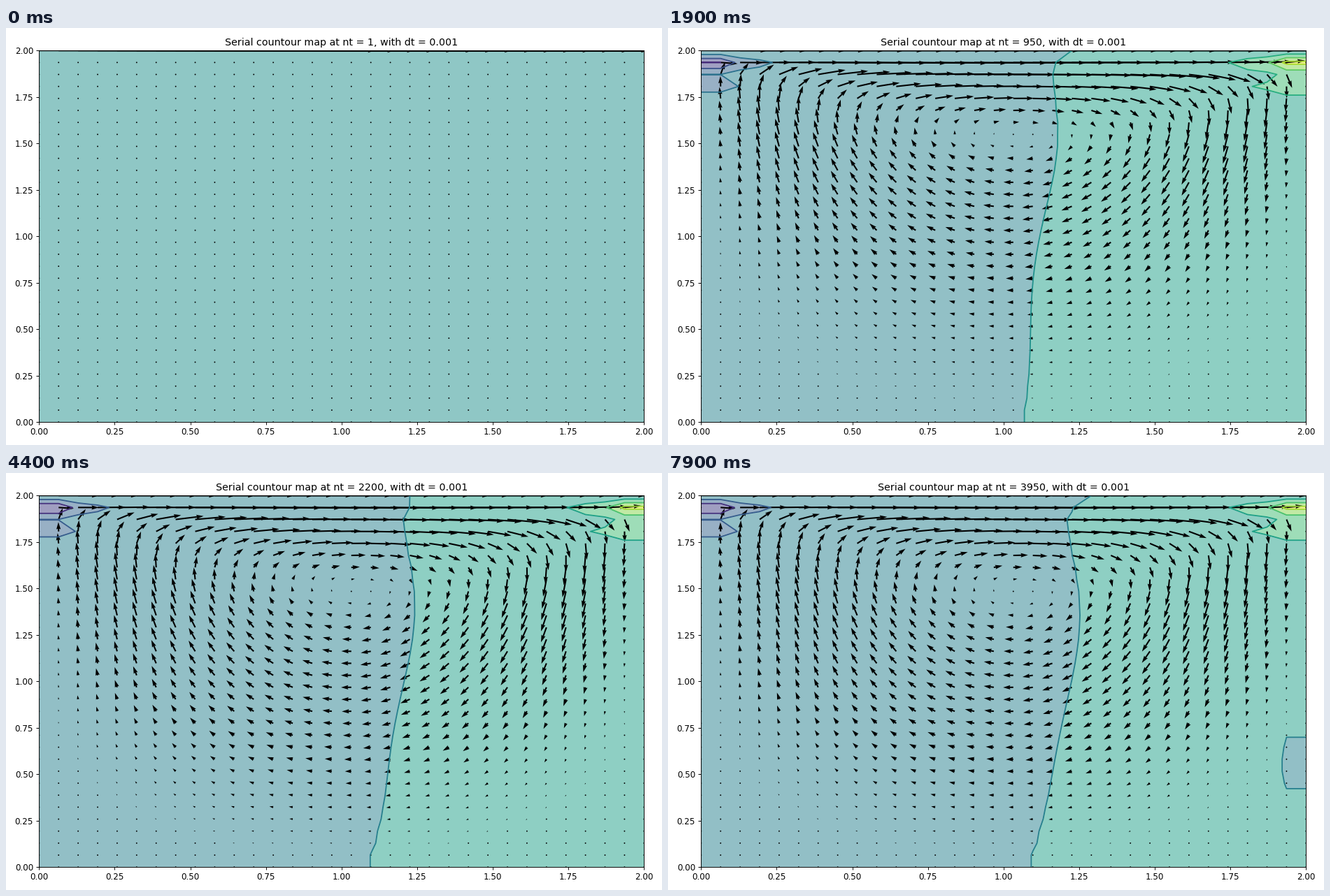
A matplotlib script for the animation above (8000 ms loop, 938 by 597 pixels).

```python
import numpy as np
import matplotlib.pyplot as plt
from matplotlib.animation import FuncAnimation
from matplotlib.colors import CenteredNorm

W, H, DPI = 938, 597, 85.27
LEFT, RIGHT, TOP, BOTTOM = 47.3, 912.3, 32.2, 564.2   # axes box in pixels
N = 32            # grid points per side
DT = 0.001
RHO, NU = 1.0, 0.1
SWEEPS = 50       # Jacobi sweeps per time step
FRAMES, STRIDE = 80, 50

h = 2 / (N - 1)
axis = np.linspace(0, 2, N)
X, Y = np.meshgrid(axis, axis)

# The Jacobi sweep is separable, so all sweeps are applied at once in its
# eigenbasis: zero-gradient walls left, right and below, p = 0 at the lid.
shift = np.eye(N - 2, k=1) + np.eye(N - 2, k=-1)
sx, sy = shift.copy(), shift.copy()
sx[0, 0] = sx[-1, -1] = sy[0, 0] = 1
lx, qx = np.linalg.eigh(sx)
ly, qy = np.linalg.eigh(sy)
mu = (ly[:, None] + lx[None, :]) / 4
decay = mu ** SWEEPS
gain = (1 - decay) / (1 - mu)


def pressure(p, u, v):
    ux = (u[1:-1, 2:] - u[1:-1, :-2]) / (2 * h)
    uy = (u[2:, 1:-1] - u[:-2, 1:-1]) / (2 * h)
    vx = (v[1:-1, 2:] - v[1:-1, :-2]) / (2 * h)
    vy = (v[2:, 1:-1] - v[:-2, 1:-1]) / (2 * h)
    b = RHO * ((ux + vy) / DT - ux**2 - 2 * uy * vx - vy**2)
    modes = decay * (qy.T @ p[1:-1, 1:-1] @ qx)
    modes += gain * (qy.T @ (-h * h / 4 * b) @ qx)
    out = np.zeros_like(p)
    out[1:-1, 1:-1] = qy @ modes @ qx.T
    out[:, -1] = out[:, -2]
    out[0] = out[1]
    out[:, 0] = out[:, 1]
    out[-1] = 0
    return out


def advance(f, u, v, grad):
    c = f[1:-1, 1:-1]
    west, east = f[1:-1, :-2], f[1:-1, 2:]
    south, north = f[:-2, 1:-1], f[2:, 1:-1]
    new = np.zeros_like(f)
    new[1:-1, 1:-1] = (
        c
        - DT / h * (u[1:-1, 1:-1] * (c - west) + v[1:-1, 1:-1] * (c - south))
        - DT / (2 * RHO * h) * grad
        + NU * DT / h**2 * (east + west + north + south - 4 * c)
    )
    return new


def simulate():
    u, v, p = np.zeros((3, N, N))
    shots = []
    for step in range(1, STRIDE * (FRAMES - 1) + 1):
        p = pressure(p, u, v)
        u_new = advance(u, u, v, p[1:-1, 2:] - p[1:-1, :-2])
        v_new = advance(v, u, v, p[2:, 1:-1] - p[:-2, 1:-1])
        u_new[-1] = 1
        u, v = u_new, v_new
        if step == 1 or step % STRIDE == 0:
            shots.append((step, u, v, p))
    return shots


shots = simulate()
fig, ax = plt.subplots(figsize=((W + 0.01) / DPI, (H + 0.01) / DPI), dpi=DPI)
fig.subplots_adjust(left=LEFT / W, right=RIGHT / W,
                    top=1 - TOP / H, bottom=1 - BOTTOM / H)


def draw(i):
    step, u, v, p = shots[i]
    ax.clear()
    flat = np.ptp(p) == 0
    ax.contourf(X, Y, p, levels=[-3, -1, 1, 3] if flat else None,
                alpha=0.5, cmap="viridis", norm=CenteredNorm())
    if not flat:
        ax.contour(X, Y, p, cmap="viridis")
    ax.quiver(X, Y, u, v)
    ax.set_xlim(0, 2)
    ax.set_ylim(0, 2)
    ax.set_title(f"Serial countour map at nt = {step}, with dt = {DT}")


anim = FuncAnimation(fig, draw, frames=FRAMES, interval=100, repeat=True)
plt.show()
```
